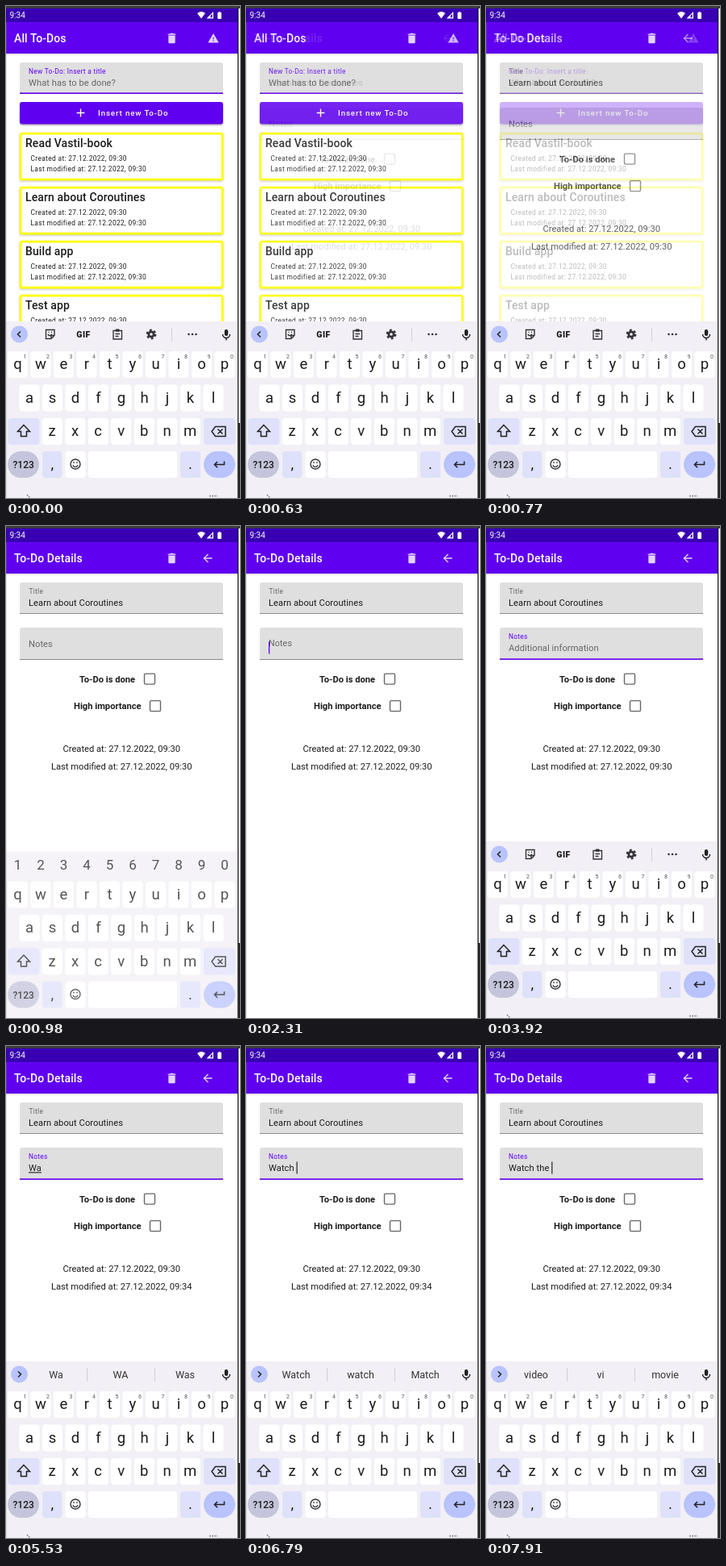
Animation of 290 by 610 pixels, one loop 8 s. Source, as an HTML page:

```html
<!DOCTYPE html>
<html lang="en">
<head>
<meta charset="utf-8">
<title>To-Do app</title>
<style>
  html, body { margin: 0; width: 100%; height: 100%; overflow: hidden; background: #fff; }
  svg { display: block; width: 290px; height: 610px; }
  text { font-family: Roboto, sans-serif; white-space: pre; fill: #1c1c1c; }
  .bar { font-size: 14px; font-weight: 500; letter-spacing: .1px; fill: #fff; }
  .head { font-size: 14px; font-weight: 500; letter-spacing: .1px; }
  .small { font-size: 8.38px; letter-spacing: .35px; }
  .label { font-size: 8.38px; letter-spacing: .28px; fill: #666; }
  .body { font-size: 11.17px; letter-spacing: .05px; }
  .bold { font-size: 11.17px; font-weight: 700; }
  .hint { fill: #666; }
  .button { font-size: 9.77px; font-weight: 500; letter-spacing: .87px; fill: #fff; }
  .key { font-size: 18.5px; text-anchor: middle; }
  .sup { font-size: 7px; fill: #555; text-anchor: middle; }
  .word { font-size: 12.5px; text-anchor: middle; fill: #333; }
  .line { fill: none; stroke: #333338; stroke-width: 1.4; }
</style>
</head>
<body>
<svg id="stage" viewBox="0 0 290 610" xmlns="http://www.w3.org/2000/svg"></svg>
<script>
const LOOP = 8000, STEP = 70;
const PURPLE = '#6000f0', DARK = '#3800b2', TINT = '#dfe1fa', ACCENT = '#b9c3fd';

const ICONS = {
  trash: 'M6 19c0 1.1.9 2 2 2h8c1.1 0 2-.9 2-2V7H6zM19 4h-3.5l-1-1h-5l-1 1H5v2h14z',
  warning: 'M1 21h22L12 2zm12-3h-2v-2h2zm0-4h-2v-4h2z',
  back: 'M20 11H7.83l5.59-5.59L12 4l-8 8 8 8 1.41-1.41L7.83 13H20z',
  plus: 'M19 13h-6v6h-2v-6H5v-2h6V5h2v6h6z'
};

const text = (x, y, cls, str, extra = '') => `<text x="${x}" y="${y}" class="${cls}" ${extra}>${str}</text>`;
const rect = (x, y, w, h, fill, r = 0, extra = '') =>
  `<rect x="${x}" y="${y}" width="${w}" height="${h}" rx="${r}" fill="${fill}" ${extra}/>`;
const line = (d, extra = '') => `<path class="line" d="${d}" ${extra}/>`;
const icon = (name, cx, cy, fill, size = 16.75) =>
  `<path d="${ICONS[name]}" fill="${fill}" transform="translate(${cx - size / 2} ${cy - size / 2}) scale(${size / 24})"/>`;
const each = (items, fn) => [...items].map(fn).join('');

function appBar(title, action, size) {
  const tone = '#e3d3ff';
  return rect(0, 59, 287, 2, '#000', 0, 'opacity=".08"') + rect(0, 20, 287, 39, PURPLE)
    + text(10, 45, 'bar', title) + icon('trash', 205.5, 40, tone) + icon(action, action === 'back' ? 250 : 257, 40, tone, size);
}

const fieldBox = (y, h) => `<path d="M17 ${y + h}V${y + 3}q0-3 3-3H266q3 0 3 3V${y + h}z" fill="#dfdfdf"/>`;

function card(title, i) {
  const y = 157 + 67 * i;
  return rect(16.5, y + 1, 253, 60, '#000', 3, 'opacity=".18" filter="url(#soft)"')
    + rect(18.2, y + 1.2, 250, 57, '#fff', 2, 'stroke="#ff0" stroke-width="2.8"')
    + text(24, y + 18, 'head', title)
    + text(30.5, y + 35, 'small', 'Created at: 27.12.2022, 09:30')
    + text(30.5, y + 48.3, 'small', 'Last modified at: 27.12.2022, 09:30');
}

function listScreen() {
  return rect(0, 20, 287, 590, '#fff') + appBar('All To-Dos', 'warning', 14.5)
    + fieldBox(70, 39) + rect(17, 107.4, 252, 1.6, PURPLE)
    + text(28, 83.5, 'label', 'New To-Do: Insert a title', `style="fill:${PURPLE}"`)
    + text(28, 98.7, 'body hint', 'What has to be done?')
    + rect(28, 86, 1.4, 16, PURPLE, 0, 'id="listCaret"')
    + rect(17, 121, 252, 27, '#000', 3, 'opacity=".3" filter="url(#soft)"')
    + rect(17, 119, 252, 27.5, PURPLE, 3) + icon('plus', 92.5, 132.5, '#fff')
    + text(114, 136.2, 'button', 'Insert new To-Do')
    + each(['Read Vastil-book', 'Learn about Coroutines', 'Build app', 'Test app'], card);
}

function checkRow(x, y, label, boxX) {
  return text(x, y + 4, 'bold', label)
    + rect(boxX, y - 6.4, 13, 13, 'none', 1.5, 'stroke="#666" stroke-width="1.4"');
}

function detailScreen() {
  return rect(0, 20, 287, 590, '#fff') + appBar('To-Do Details', 'back', 16.75)
    + fieldBox(70, 39) + rect(17, 108.2, 252, .8, '#777')
    + text(28.5, 83.5, 'label', 'Title') + text(28, 98.5, 'body', 'Learn about Coroutines')
    + fieldBox(126, 40) + rect(17, 165, 252, .8, '#777', 0, 'id="noteLine"')
    + text(28, 150, 'label', 'Notes', 'id="noteLabel"')
    + text(28, 155.3, 'body hint', 'Additional information', 'id="noteHint"')
    + text(28, 155.3, 'body', '', 'id="note"') + rect(28, 143.5, 1.3, 15, PURPLE, 0, 'id="noteCaret"')
    + checkRow(91, 189.5, 'To-Do is done', 171.5) + checkRow(84, 223, 'High importance', 178.5)
    + text(70.5, 280, 'body', 'Created at: 27.12.2022, 09:30', 'style="letter-spacing:0"')
    + text(56, 302, 'body', '', 'id="modified" style="letter-spacing:0"');
}

const key = (cx, cy, label) => rect(cx - 12.5, cy - 16.5, 25, 33, '#fff', 4) + text(cx, cy + 5.7, 'key', label);
const keyRow = (letters, x, y) => each(letters, (c, i) => key(x + 28.5 * i, y, c));
const divider = x => rect(x, 399, 1, 17, '#cfced6');

function toolIcons() {
  return line('M49.5 401.5h10.5v7l-4 4h-6.5zM60 408.5h-4v4M51.8 407q2.5 3.5 5 0M52.5 404.5h1M56 404.5h1')
    + text(96, 410.8, '', 'GIF', 'font-size="10.5" font-weight="900" text-anchor="middle" letter-spacing=".4"')
    + line('M133 402.5h10.5v10.5h-10.5zM135.5 406.5h5.5M135.5 409.5h4') + rect(135.7, 400.5, 5, 3.2, '#333338', 1)
    + '<circle class="line" cx="180" cy="407" r="5.2" stroke-dasharray="2.7 2.75" style="stroke-width:2.4"/>'
    + '<circle class="line" cx="180" cy="407" r="3.2" style="stroke-width:2.8"/>'
    + divider(205) + each([226.5, 231, 235.5], x => `<circle cx="${x}" cy="407" r="1.3" fill="#333338"/>`);
}

function keyboard() {
  const dark = 'style="stroke:#222;stroke-width:1.5"';
  return rect(0, 391, 287, 219, '#f2f0f6')
    + `<g id="topBar"><circle cx="16.5" cy="407" r="10.5" fill="${ACCENT}"/>`
    + `<path id="chevron" class="line" ${dark}/><g id="tools">${toolIcons()}</g>`
    + `<g id="words">${divider(100)}${divider(184)}${each([62, 142, 222], x => text(x, 412, 'word', ''))}</g>`
    + rect(270.8, 401, 4.4, 8, '#222', 2.2) + line('M268.5 407a4.5 4.5 0 0 0 9 0M273 411.5v3', dark) + '</g>'
    + `<g id="digitRow">${each('1234567890', (d, i) => text(14.5 + 28.5 * i, 413.6, 'key', d, 'style="font-size:17px"'))}</g>`
    + keyRow('qwertyuiop', 14.5, 444.5)
    + `<g id="sups">${each('1234567890', (d, i) => text(23.5 + 28.5 * i, 437, 'sup', d))}</g>`
    + keyRow('asdfghjkl', 29, 486) + keyRow('zxcvbnm', 57.2, 527.5)
    + rect(2.5, 511, 39, 33, TINT, 4) + line('M22 519.5l-7.5 8h4v6h7v-6h4z', dark)
    + rect(245, 511, 39, 33, TINT, 4) + line('M255 527.5l4.5-6h12.5v12h-12.5zM262.5 524.5l6 6M268.5 524.5l-6 6', dark)
    + rect(2, 552, 39, 33, '#c4c4dc', 16.5) + text(21.7, 573, '', '?123', 'font-size="12" font-weight="500" text-anchor="middle"')
    + rect(45, 552, 24.5, 33, TINT, 4) + text(57.2, 574, 'key', ',')
    + rect(73.5, 552, 25, 33, '#fff', 4) + '<circle class="line" cx="86" cy="568" r="6"/>'
    + line('M82.8 569.3q3.2 4.6 6.4 0M83.3 566h1.6M87.2 566h1.6')
    + rect(102, 552, 110, 33, '#fff', 4) + rect(216, 552, 25, 33, TINT, 4) + text(228.5, 574, 'key', '.')
    + rect(245, 552, 39, 33, ACCENT, 16.5) + line('M270.5 564.5v4h-12M262 565l-3.6 3.6 3.6 3.6', dark)
    + '<g id="navMarks">' + line('M26 606l4 4M252 607.5h10', 'stroke-dasharray="2 1" opacity=".6"') + '</g>';
}

function frame() {
  return rect(0, 0, 290, 3, '#3c3b40') + rect(0, 3, 287, 17, DARK)
    + text(4.5, 15, '', '9:34', 'font-size="10" style="fill:#fff"')
    + '<path d="M237 9Q242 5 247 9L242 15.5Z" fill="#fff"/>'
    + '<path d="M248.5 15.5L257 7V15.5Z" fill="#fff"/><path d="M253.5 14.2V11.9L255.7 9.8V14.2Z" fill="#3800b2"/>'
    + rect(262.2, 8, 4.8, 8, '#fff', .8) + rect(263.6, 7, 2, 2, '#fff')
    + rect(0, 20, .6, 590, '#999', 0, 'opacity=".5"')
    + rect(287, 3, 1.5, 607, '#111') + rect(288.5, 3, 1.5, 514, '#fff') + rect(288.5, 517, 1.5, 93, '#111');
}

document.getElementById('stage').innerHTML =
  '<defs><filter id="soft" x="-5%" y="-20%" width="110%" height="140%"><feGaussianBlur stdDeviation="1.3"/></filter></defs>'
  + `${listScreen()}<g id="detail">${detailScreen()}</g><g id="keyboard">${keyboard()}</g>${frame()}`;

const ui = {};
document.querySelectorAll('[id]').forEach(node => ui[node.id] = node);
const slots = ui.words.querySelectorAll('text');

// [time, committed text, word being typed, suggestions (empty = tool bar)]
const EDITS = [
  [0, '', '', ''],
  [4340, '', 'W', 'We W What'],
  [5040, '', 'Wa', 'We W What'],
  [5110, '', 'Wa', ''],
  [5250, '', 'Wa', 'Wa WA Was'],
  [5600, '', 'Wat', 'Wa WA Was'],
  [5740, '', 'Wat', ''],
  [5810, '', 'Wat', 'Wat Watch Water'],
  [6440, '', 'Watc', 'Wat Watch Water'],
  [6510, '', 'Watch', 'Wat Watch Water'],
  [6580, '', 'Watch', 'Watch watch Match'],
  [6790, 'Watch ', '', 'Watch watch Match'],
  [6860, 'Watch ', '', 'the a it'],
  [7000, 'Watch ', '', ''],
  [7070, 'Watch ', '', 'the a it'],
  [7210, 'Watch ', 't', 'the a it'],
  [7280, 'Watch ', 't', 'the to too'],
  [7490, 'Watch ', 'the', 'the to too'],
  [7700, 'Watch the ', '', 'the The then'],
  [7910, 'Watch the ', '', 'video vi movie']
];
const CARET_ON = [[2310, 2870], [3360, 3920], [4340, 4900], [5040, 5530], [5600, 6160], [6440, LOOP]];

const FADE = [[490, 0], [560, .03], [630, .14], [700, .4], [770, .7], [840, .9], [910, 1]];
const KEYS_ALPHA = [[840, 1], [910, .95], [980, .75], [1050, .35], [1120, 0], [2310, 0], [2380, .5], [2450, .85], [2520, 1]];
const KEYS_SHIFT = [[840, 0], [910, 3], [980, 12.5], [1050, 32], [1120, 60], [2310, 40], [2380, 20], [2450, 6], [2520, 0]];
const FOCUS = [[2240, 0], [2310, .14], [2380, .6], [2450, 1]];

function track(stops, t) {
  const i = stops.findIndex(s => s[0] > t);
  if (i < 0) return stops[stops.length - 1][1];
  if (i === 0) return stops[0][1];
  const [t0, a] = stops[i - 1], [t1, b] = stops[i];
  return a + (b - a) * (t - t0) / (t1 - t0);
}

const show = (node, on) => node.setAttribute('visibility', on ? 'visible' : 'hidden');

function render(t) {
  const [, done, typing, suggestions] = EDITS.filter(e => e[0] <= t).pop();
  const focus = track(FOCUS, t), empty = !(done + typing);

  show(ui.listCaret, t >= 70 && t < 560);
  ui.detail.setAttribute('opacity', track(FADE, t));

  ui.noteLabel.setAttribute('y', 150 - 10 * focus);
  ui.noteLabel.style.fontSize = 11.17 - 2.79 * focus + 'px';
  ui.noteLabel.style.letterSpacing = .05 + .23 * focus + 'px';
  ui.noteLabel.style.fill = focus > .5 ? PURPLE : '#666';
  ui.noteLine.setAttribute('y', focus > .5 ? 164.3 : 165);
  ui.noteLine.setAttribute('height', focus > .5 ? 1.6 : .8);
  ui.noteLine.setAttribute('fill', focus > .5 ? PURPLE : '#777');
  ui.noteHint.setAttribute('opacity', empty ? Math.max(0, focus * 1.5 - .5) : 0);

  ui.note.innerHTML = done + (typing ? `<tspan text-decoration="underline">${typing}</tspan>` : '');
  ui.noteCaret.setAttribute('x', 28 + (empty ? 0 : ui.note.getComputedTextLength()));
  ui.noteCaret.setAttribute('fill', empty ? PURPLE : '#333');
  show(ui.noteCaret, CARET_ON.some(([a, b]) => t >= a && t < b));
  ui.modified.textContent = 'Last modified at: 27.12.2022, 09:' + (t < 4340 ? 30 : 34);

  const closing = t >= 910 && t < 2310;
  ui.keyboard.setAttribute('opacity', track(KEYS_ALPHA, t));
  ui.keyboard.setAttribute('transform', `translate(0 ${track(KEYS_SHIFT, t)})`);
  ui.topBar.setAttribute('display', closing ? 'none' : 'inline');
  for (const part of [ui.sups, ui.navMarks]) show(part, !closing);
  show(ui.digitRow, closing);
  show(ui.tools, !suggestions);
  show(ui.words, suggestions);
  ui.chevron.setAttribute('d', suggestions ? 'M15 403.5l3.5 3.5-3.5 3.5' : 'M18 403.5l-3.5 3.5 3.5 3.5');
  const words = suggestions.split(' ');
  slots.forEach((slot, i) => slot.textContent = words[i] || '');
}

const start = performance.now();
let last = -1;
function tick() {
  const t = Math.floor((performance.now() - start) % LOOP / STEP) * STEP;
  if (t !== last) render(last = t);
  requestAnimationFrame(tick);
}
tick();
</script>
</body>
</html>
```
